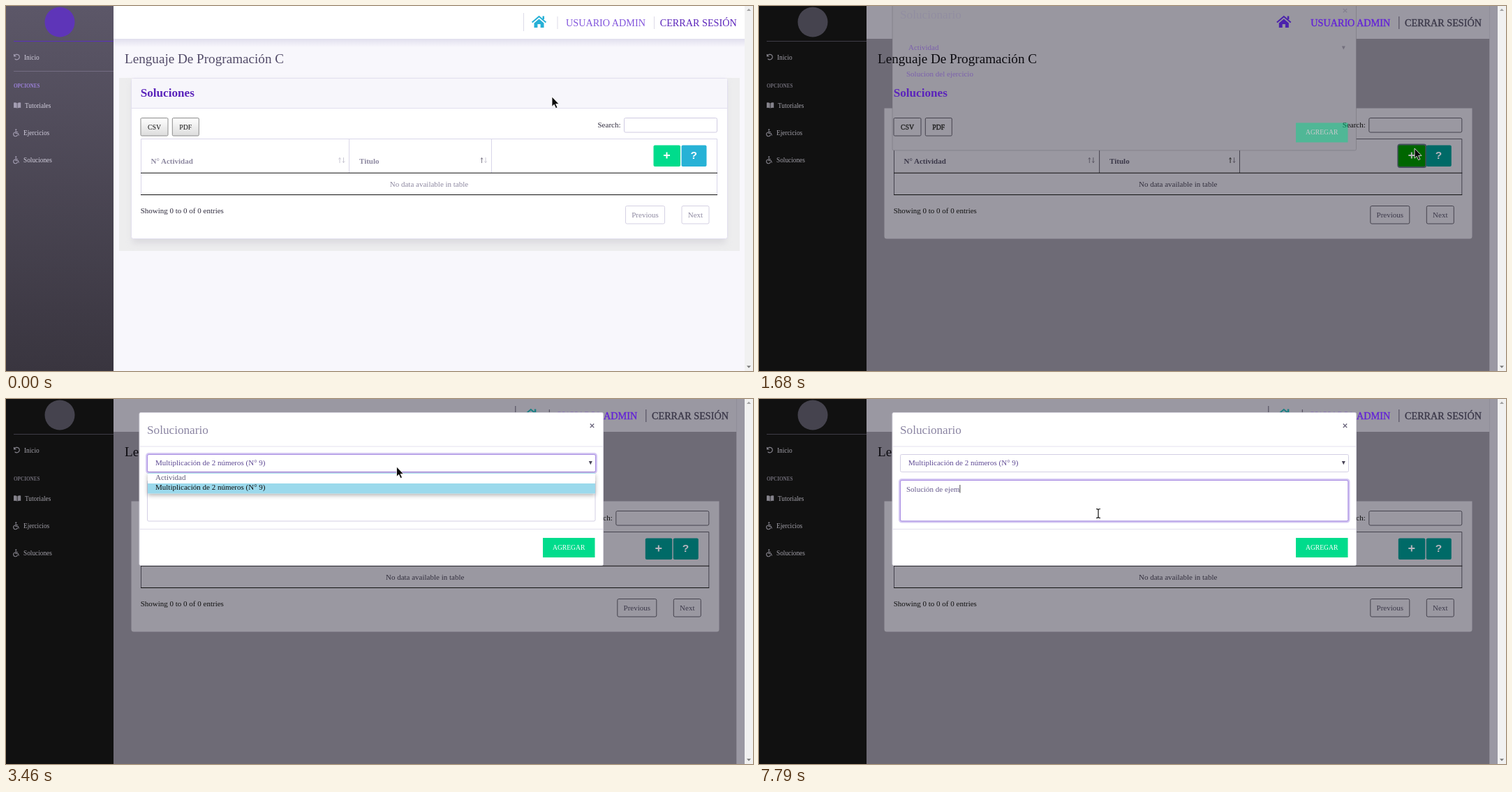
These frames come from a looping animation (1070 by 523 pixels, 8000 ms). An HTML page:

```html
<!DOCTYPE html>
<html lang="es">
<head>
<meta charset="utf-8">
<title>Soluciones</title>
<style>
html, body { margin: 0; width: 100%; height: 100%; overflow: hidden; }
svg { display: block; width: 1070px; height: 523px; font-family: "Liberation Serif", "Times New Roman", serif; }
text { white-space: pre; }
</style>
</head>
<body>
<svg id="stage" viewBox="0 0 1070 523"></svg>
<script>
const LOOP = 8000;
const stage = document.getElementById('stage');
const PURPLE = '#5b24bb';

const light = {
  side: 'url(#side)', logo: '#5e35b8', rule1: '#5a30bd', rule2: '#736c82', nav: '#d3cfde', icon: '#a49eb3', group: '#9b80d8',
  bar: '#fff', page: '#f8f7fc', strip: '#f8f7fc', wrap: '#ededee', head: '#f7f6fb', card: '#fff', edge: '#e2dfee',
  sep: '#dddbe8', home: '#27b0d6', user: '#8255dc', exit: PURPLE, title: '#534c69', cardTitle: PURPLE,
  btnA: '#fff', btnB: '#dcdcdc', btnEdge: '#8c8c8c', ink: '#111', label: '#2f2b3d', line: '#d9d6e9', rule: '#111',
  th: '#8d88a0', td: '#8d88a0', field: '#fff', fieldEdge: '#cfcbe2', page1: '#8d88a0', help: '#27b2d6', mark: '#fff',
  sort: '#c5c2d0', sortOn: '#777283', weight: 0
};
const mid = {
  ...light, side: 'url(#sideMid)', rule1: '#777083', icon: '#8867d2', nav: '#d8d3e6', group: '#8e6ee0',
  bar: '#f0f0f0', page: '#eae8ee', strip: '#f0f0f1', wrap: '#e0dfe2', head: '#ebe9ef', card: '#f0f0f0', edge: '#d0cedb',
  sep: '#cbc8d6', btnA: '#f3f3f3', btnB: '#c9c9cb', line: '#cfcbe2', th: '#7a63bd', td: '#7a63b5',
  field: '#f0f0f0', page1: '#7a6ca6'
};
const dark = {
  ...light, side: '#111', logo: '#45434e', rule1: '#3f3c47', rule2: 'none', nav: '#a3a1aa', icon: '#85838c', group: '#6e6b76',
  bar: '#9a98a2', page: '#6e6b76', strip: '#9a98a3', wrap: 'none', head: 'none', card: '#9a98a1', edge: 'none',
  sep: '#4b4857', home: '#1b7f83', user: '#6322d8', exit: '#3b3849', title: '#0c0b10',
  btnA: '#9a98a1', btnB: '#9a98a1', btnEdge: '#45434e', ink: '#222', label: '#111', line: '#45434e',
  th: '#3b3849', td: '#33303e', field: '#9a98a1', fieldEdge: '#45434e', page1: '#3b3849', help: '#006a67', mark: '#b7b5be',
  sort: '#56535f', sortOn: '#222', weight: .35
};

const defs = `<defs>
  <linearGradient id="side" x2="0" y2="1"><stop stop-color="#5c5768"/><stop offset="1" stop-color="#39353f"/></linearGradient>
  <linearGradient id="sideMid" x2="0" y2="1"><stop stop-color="#5a5566"/><stop offset=".92" stop-color="#39353f"/>
    <stop offset=".95" stop-color="#111"/><stop offset="1" stop-color="#111"/></linearGradient>
  <linearGradient id="fall" x2="0" y2="1"><stop stop-color="#aaa6cc" stop-opacity=".3"/><stop offset="1" stop-color="#aaa6cc" stop-opacity="0"/></linearGradient>
  <filter id="soft" x="-5%" y="-60%" width="110%" height="220%"><feGaussianBlur stdDeviation="3"/></filter>
  <filter id="wide" x="-5%" y="-10%" width="110%" height="120%"><feGaussianBlur stdDeviation="5"/></filter>
</defs>`;

const rect = (x, y, w, h, fill, more = '') => `<rect x="${x}" y="${y}" width="${w}" height="${h}" fill="${fill}" ${more}/>`;
const box = (x, y, w, h, fill, stroke, r = 2) => rect(x, y, w, h, fill, `stroke="${stroke}" rx="${r}"`);
const text = (x, y, size, str, fill, more = '') => `<text x="${x}" y="${y}" font-size="${size}" fill="${fill}" ${more}>${str}</text>`;
const path = (d, stroke, more = '') => `<path d="${d}" fill="none" stroke="${stroke}" ${more}/>`;
const shape = (d, fill, more = '') => `<path d="${d}" fill="${fill}" ${more}/>`;
const clamp = v => Math.max(0, Math.min(1, v));
const BOLD = 'font-weight="700"';
const MIDDLE = 'text-anchor="middle"';

const homeIcon = (x, fill) => `<g transform="translate(${x})">` +
  shape('M756.5 24.5L763.5 18.5L770.5 24.5V31H765.6V26H761.4V31H756.5ZM768.5 14.5H771V19H768.5Z', fill) +
  path('M753.6 23.4L763.5 15L773.4 23.4', fill, 'stroke-width="2"') + '</g>';

function sidebar(p) {
  const wheel = y => path(`M14 ${y - 2}v3.5h3.2l1.3 3M14 ${y - .5}h3M13 ${y}a2.9 2.9 0 1 0 3.4 3.4`, p.icon, 'stroke-width="1.1"') +
    `<circle cx="14.3" cy="${y - 3.6}" r="1.1" fill="${p.icon}"/>`;
  return rect(0, 0, 154, 523, p.side) +
    `<circle cx="77" cy="23" r="21.5" fill="${p.logo}"/>` +
    path('M11 50.5H154', p.rule1) + path('M11 93.5H154', p.rule2) +
    path('M12.2 71.2A3.8 3.8 0 1 1 12.6 75.6M11.6 69v3h3', p.icon, 'stroke-width="1.2"') +
    shape('M11 138.5q3-.6 4.7.7v7.4q-1.8-1.2-4.7-.7ZM21.2 138.5q-3-.6-4.7.7v7.4q1.8-1.2 4.7-.7Z', p.icon) +
    wheel(181) + wheel(220) +
    text(26, 77, 9.3, 'Inicio', p.nav) +
    text(11, 116.5, 7.2, 'OPCIONES', p.group, BOLD) +
    text(27, 146, 9.3, 'Tutoriales', p.nav) +
    text(25, 185, 9.3, 'Ejercicios', p.nav) +
    text(25, 224, 9.3, 'Soluciones', p.nav);
}

// dx is the shift of everything anchored to the right side
function panels(p, dx) {
  const right = 1058 + dx, mode = p === light ? 0 : p === mid ? 1 : 2;
  let s = rect(154, 0, 904, 523, p.page) + rect(right, 0, 1058 - right, 523, p.strip);
  if (mode < 2) s += rect(154, 47, right - 154, 12, 'url(#fall)') + rect(162, 103, 889 + dx, 248, p.wrap);
  if (mode === 0) s += rect(181, 108, 850, 232, '#cfced4', 'filter="url(#wide)" opacity=".6"');
  if (mode === 1) s += shape(`M179 103H${1021}Q1034 103 1034 122V328Q1034 348 1012 348H188Q166 348 166 328V122Q166 103 179 103Z`, '#cbcad0');
  s += rect(154, 0, right - 154, 47, p.bar);
  for (const x of [741.5, 790, 928.5]) s += path(`M${x + dx} ${x === 741.5 ? 10 : 15}V${x === 741.5 ? 36 : 33}`, p.sep);
  if (mode < 2) {
    s += box(179.5, 103.5, 854 + dx, 230, p.card, p.edge, 3) +
      rect(180, 104, 853 + dx, 42, p.head) + path(`M180 146.5H${1033 + dx}`, p.edge);
  } else {
    s += shape('M179.5 146.5H1021.5V330Q1021.5 333.5 1018 333.5H183Q179.5 333.5 179.5 330Z', p.card);
  }
  const end = 1018.5 + dx, c1 = 491.5 + dx / 3, c2 = 695.5 + dx * .6;
  return s + path(`M193.5 270V190.5H${end}V270M${c1} 190V239M${c2} 190V239`, p.line) +
    path(`M193 239.2H${end + .5}M193 270.5H${end + .5}`, p.rule, 'stroke-width="1.1"');
}

function sortPair(x, up, down) {
  return path(`M${x} 225v-7.5m-1.5 2l1.5-2l1.5 2`, up, 'stroke-width=".9"') +
    path(`M${x + 5.5} 217v7.5m-1.5-2l1.5 2l1.5-2`, down, 'stroke-width=".9"');
}

function content(p, dx, t) {
  const heavy = p.weight ? c => `stroke="${c}" stroke-width="${p.weight}"` : () => '';
  const focused = t >= 1390 && t < 2770;
  const dim = p === dark;
  const add = dim ? (focused ? '#006600' : p.help) : focused ? '#2bd62b' : t >= 1040 ? '#00b975' : '#00dc8c';
  const tool = (x, w, label) => box(x, 160.5, w, 25.5, `url(#${label})`, p.btnEdge, 1.5) +
    text(x + w / 2, 176.7, 9.8, label, p.ink, MIDDLE + heavy(p.ink).replace('stroke=', ' stroke='));
  const grad = id => `<linearGradient id="${id}" x2="0" y2="1"><stop stop-color="${p.btnA}"/><stop offset="1" stop-color="${p.btnB}"/></linearGradient>`;
  const home = dim && t < 1760 ? '#4b22ac' : p.home;
  let s = grad('CSV') + grad('PDF') + homeIcon(dx, home) +
    text(802 + dx, 28.8, 14.2, 'USUARIO ADMIN', p.user, heavy(p.user)) +
    text(936.7 + dx, 28.8, 14.2, 'CERRAR SESIÓN', p.exit, heavy(p.exit)) +
    text(170, 81.5, 19.15, 'Lenguaje De Programación C', p.title) +
    text(192.7, 130, 17.15, 'Soluciones', p.cardTitle, BOLD) +
    tool(193, 39, 'CSV') + tool(238.3, 38, 'PDF') +
    text(847.5 + dx, 174, 11, 'Search:', p.label) +
    box(885.5 + dx, 160.5, 133, 20.5, p.field, p.fieldEdge) +
    text(207.5, 226, 11, 'N° Actividad', p.th, BOLD) +
    text(506 + dx / 3, 226, 11, 'Titulo', p.th, BOLD) +
    sortPair(478 + dx * .4, p.sort, p.sort) + sortPair(681.5 + dx * .55, p.sortOn, p.sort) +
    text(606 + dx / 2, 258.5, 11, 'No data available in table', p.td, MIDDLE) +
    text(192.7, 297, 11, 'Showing 0 to 0 of 0 entries', p.label) +
    box(887.5 + dx, 286.5, 56, 25.5, 'none', dim ? p.line : '#d5d1e3') + text(915.5 + dx, 303, 11, 'Previous', p.page1, MIDDLE) +
    box(968 + dx, 286.5, 39, 25.5, 'none', dim ? p.line : '#d5d1e3') + text(987.5 + dx, 303, 11, 'Next', p.page1, MIDDLE);
  if (focused) s += rect(926 + dx, 197.5, 42, 34.5, dim ? '#45505c' : '#41b7d8', 'rx="4"');
  s += rect(927.5 + dx, 199.5, 38.5, 30.5, add, 'rx="2"') +
    path(`M${942 + dx} 214h9m-4.5-4.5v9`, p.mark, 'stroke-width="2"') +
    rect(967.5 + dx, 199.5, 36, 30.5, p.help, 'rx="2"') +
    text(985.3 + dx, 219.2, 15.5, '?', p.mark, MIDDLE + ' font-family="Liberation Sans, sans-serif" font-weight="700"');
  return s;
}

const PHRASE = 'Solución de ejem';
const KEYS = [5030, 5140, 5240, 5500, 5650, 5730, 6030, 6380, 6570, 6760, 6860, 7010, 7390, 7510, 7650, 7790];
const ADVANCE = { S: .556, o: .5, l: .278, u: .5, c: .444, i: .278, 'ó': .5, n: .5, ' ': .25, d: .5, e: .444, j: .278, m: .778, '´': .333 };

function typed(t) {
  const str = PHRASE.slice(0, KEYS.filter(k => k <= t).length);
  return t >= 5980 && t < 6030 ? str + '´' : str;
}

function glow(x, y, w, h, amount) {
  return amount > 0 ? `<g opacity="${amount}">` + box(x - 1, y - 1, w + 2, h + 2, 'none', '#d5c9f3', 3).replace('/>', 'stroke-width="3"/>') +
    box(x, y, w, h, 'none', '#a78ae2') + '</g>' : '';
}

function options(t) {
  const second = t >= 3460;
  return rect(203, 108, 641, 30, '#000', 'opacity=".3" filter="url(#soft)"') +
    rect(203, 106, 641, 29.5, '#fff') + path('M203 106.5H844', '#a9dfee') +
    rect(203, second ? 121 : 106, 641, 14.5, '#9bd9ec') +
    text(214, 116, 11, 'Actividad', second ? '#625d7c' : '#111') +
    text(214, 130, 11, 'Multiplicación de 2 números (N° 9)', second ? '#111' : '#625d7c');
}

function modal(t, ghost) {
  const chosen = t >= 3460;
  const selectGlow = clamp((t - 2700) / 150) * (1 - clamp((t - 4640) / 140));
  const areaGlow = clamp((t - 4640) / 140);
  const str = typed(t);
  let s = ghost ? box(191, 19.5, 664.5, 219, 'none', '#6e6c76', 2) : box(191, 19.5, 664.5, 219, '#fff', '#d9d7e0', 2);
  s += text(202, 49.5, 17.2, 'Solucionario', '#8a84a2') +
    path('M836.8 35.5l5.4 5.4m0-5.4l-5.4 5.4', '#6f6a80', 'stroke-width="1.4"') +
    path('M191.5 68H855M191.5 186.5H855', ghost ? 'none' : '#e3e0ee') +
    box(202.5, 79.5, 642, 25, ghost ? 'none' : '#fff', ghost ? 'none' : '#d3cfe4') +
    box(202.5, 116.5, 641.5, 58.5, ghost ? 'none' : '#fff', ghost ? 'none' : '#d3cfe4') +
    glow(202.5, 79.5, 642, 25, selectGlow) + glow(202.5, 116.5, 641.5, 58.5, areaGlow) +
    text(214, 95, 11, chosen ? 'Multiplicación de 2 números (N° 9)' : 'Actividad', chosen ? '#5f4a94' : ghost ? PURPLE : '#6a6584') +
    shape('M834.8 89h5l-2.5 5.2Z', '#4a4658') +
    (str ? text(211, 132.5, 11, str, '#665a8c') : text(211, 132.5, 11, 'Solucion del ejercicio', ghost ? PURPLE : '#928da6')) +
    rect(769, 199, 74.5, 28, '#00dc8c') + text(806.2, 215.6, 9.6, 'AGREGAR', '#fff', MIDDLE);
  if (t >= 4780) {
    const x = 211.5 + 11 * [...str].reduce((sum, c) => sum + ADVANCE[c], 0);
    s += path(`M${x} 123V134.5`, '#444');
  }
  if (t >= 2900 && t < 3910) s += options(t);
  return s;
}

const TRACK = [[0, 782, 130], [480, 782, 130], [1160, 939, 204], [1840, 939, 204], [2180, 652, 156], [2430, 559.5, 97], [4230, 559.5, 97], [4390, 486, 164], [LOOP, 486, 164]];

function pointer(t) {
  const i = TRACK.findIndex((k, n) => n && t < k[0]) || 1;
  const [t0, x0, y0] = TRACK[i - 1], [t1, x1, y1] = TRACK[i];
  const u = (t - t0) / (t1 - t0), e = i === 2 ? u * u * (3 - 2 * u) : u;
  const x = x0 + (x1 - x0) * e, y = y0 + (y1 - y0) * e;
  const beam = t > 1900 && x > 203 && x < 844 && y > 116 && y < 175;
  const bar = 'M-3 -6.5Q0 -6.5 0 -5Q0 -6.5 3 -6.5M0 -5V5M-3 6.5Q0 6.5 0 5Q0 6.5 3 6.5';
  return `<g transform="translate(${x} ${y})">` + (beam
    ? path(bar, '#fff', 'stroke-width="2.6"') + path(bar, '#111', 'stroke-width="1.2"')
    : shape('M0 0V14.2L3.2 11.2L5.6 16.6L8 15.5L5.6 10.4H10Z', '#0b0b0b', 'stroke="#fff" stroke-width=".8"')) + '</g>';
}

const scrollbar = rect(1058, 0, 12, 523, '#f1f1f1') + shape('M1061 7h6l-3-3.2Z', '#a0a0a0') + shape('M1061 515.5h6l-3 3.2Z', '#777');

function scene(t) {
  const p = t < 1450 ? light : t < 1600 ? mid : dark;
  const dx = t < 1450 ? 0 : -11.7;
  const u = clamp((t - 1610) / 300);
  const lift = -50 * Math.pow(1 - u, 1.7);
  const alpha = clamp((t - 1610) / 150);
  const ghost = alpha < .6;
  const open = t >= 1610;
  let s = defs + panels(p, dx);
  if (open && ghost) s += rect(191, 19.5 + lift, 664.5, 219, '#9997a0', `opacity="${clamp(alpha * 2.2)}"`);
  s += content(p, dx, t) + sidebar(p);
  if (open) s += `<g transform="translate(0 ${lift})" opacity="${alpha}">${modal(t, ghost)}</g>`;
  return s + scrollbar + pointer(t);
}

let shown = '';
function draw(now) {
  const next = scene(now % LOOP);
  if (next !== shown) stage.innerHTML = shown = next;
}
const start = performance.now();
function tick() {
  draw(performance.now() - start);
  requestAnimationFrame(tick);
}
tick();
</script>
</body>
</html>
```
